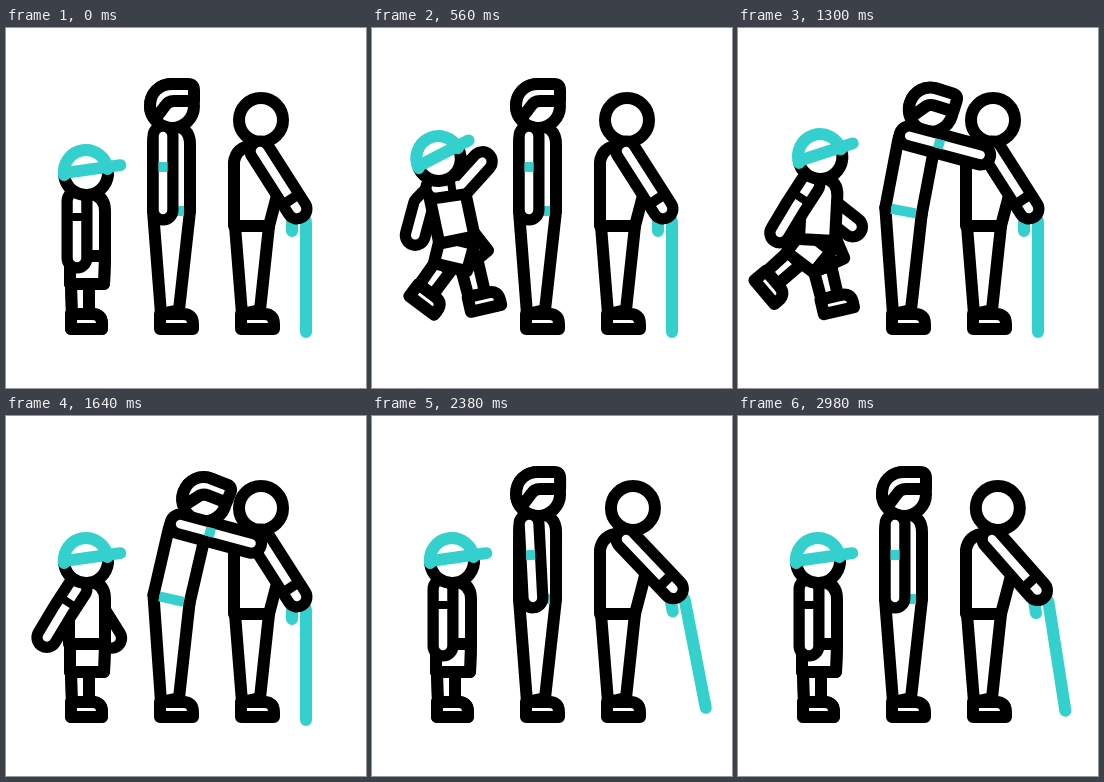
An HTML page with a canvas for the animation above (3 s loop, 360 by 360 pixels).

```html
<!DOCTYPE html>
<html lang="en">
<head>
<meta charset="utf-8">
<title>Three generations</title>
<style>
html, body { margin: 0; width: 100%; height: 100%; overflow: hidden; background: #fff }
canvas { display: block }
</style>
</head>
<body>
<canvas width="360" height="360"></canvas>
<script>
const ctx = document.querySelector('canvas').getContext('2d');
const BLACK = '#000', WHITE = '#fff', TEAL = '#33d0cd', LOOP = 3000, PEN = 12;

// Eased rise from 0 to 1 between two times
function rise(t, from, to) {
  const p = Math.min(1, Math.max(0, (t - from) / (to - from)));
  return p * p * (3 - 2 * p);
}

// Rises, holds, then falls back to 0
const hold = (t, a, b, c, d) => rise(t, a, b) - rise(t, c, d);

const rad = deg => deg * Math.PI / 180;

function turn(x, y, deg) {
  const c = Math.cos(rad(deg)), s = Math.sin(rad(deg));
  return [x * c - y * s, x * s + y * c];
}

function at(x, y, deg, draw) {
  ctx.save();
  ctx.translate(x, y);
  ctx.rotate(rad(deg));
  draw();
  ctx.restore();
}

function line(d, color = BLACK, width = PEN, cap = 'round') {
  ctx.strokeStyle = color;
  ctx.lineWidth = width;
  ctx.lineCap = cap;
  ctx.stroke(new Path2D(d));
}

function shape(d, color) {
  ctx.fillStyle = WHITE;
  ctx.fill(new Path2D(d));
  line(d, color);
}

function limb(d) {
  line(d, BLACK, 31);
  line(d, WHITE, 8.5);
}

function disc(x, y, r) {
  shape(`M${x - r} ${y}a${r} ${r} 0 1 1 ${2 * r} 0a${r} ${r} 0 1 1 ${-2 * r} 0Z`);
}

// Shoe with its heel at x, y
function shoe(x, y, w) {
  shape(`M${x} ${y}v-15h${w - 10}q10 0 10 10v5Z`);
}

function elder(t) {
  const wave = (from, length) => Math.cos(Math.PI * (t - from) / length);
  const swing = t < 1740 ? 0 : 7.25 * (t < 2690 ? 1 - wave(1740, 950) : 1 + wave(2690, 680));
  shape('M229 198L236 286L254 282L263 198Z');
  shoe(235, 301, 33);
  shape('M228 198V134Q230 119 248 117L275 152L263 198Z');
  disc(255 + swing * .54, 92, 22);
  at(254, 123, -swing, () => {
    line('M32 80V72a7 7 0 0 1 14 0V181', TEAL);
    limb('M0 0L37 58');
    line('M24 53L36 45', BLACK, 10);
  });
}

function adult(t) {
  const lean = hold(t, 800, 1480, 1800, 2400);
  const lift = 75 * hold(t, 680, 1280, 1800, 2460);
  const tilt = 13 * lean, px = 165, py = 183;
  const hip = x => {
    const [dx, dy] = turn(x, 0, tilt);
    return `${px + dx} ${py + dy}`;
  };
  shape(`M${hip(-18)}L155 286L173 282L${hip(19)}`);
  shoe(154, 301, 33);
  at(px, py, tilt, () => {
    shape('M-18 0V-68Q-18 -85 -1 -86Q19 -85 19 -67V0');
    line('M-12 0H13', TEAL, 10, 'butt');
    at(4.5 * lean, -73, 8 * lean, () => {
      disc(1, -32, 22);
      shape('M-17 -20Q-21 -26 -21 -32C-21 -45 -12 -54 1 -54H17Q23 -54 23 -48V-37H3Q-3 -37 -6 -32L-15 -20Z');
    });
  });
  const [sx, sy] = turn(-8, -75, tilt);
  at(px + sx, py + sy, -lift, () => {
    limb('M0 0V74');
    line('M-4.5 31H4.5', TEAL, 10, 'butt');
  });
}

function childArm(x, y, upper, lower) {
  const [ex, ey] = turn(0, 26, upper), [hx, hy] = turn(0, 31, lower);
  at(x, y, 0, () => limb(`M0 0l${ex} ${ey}l${hx} ${hy}`));
  at(x, y, upper, () => line('M-7 16H7', BLACK, 8));
}

function childLeg(x, y, thigh, shin) {
  const [kx, ky] = turn(-7, 28, thigh);
  at(x + kx, y + ky, shin, () => {
    shape('M-9 0L-8 30H9V0Z');
    shoe(-9, 45, 31);
  });
  at(x, y, thigh, () => shape('M-17 0V28H17L18 0Z'));
}

function child(t) {
  // Two hops with a dip between them: arm up on the first, arms back on the second
  const dip = hold(t, 720, 960, 960, 1200);
  const stride = hold(t, 160, 560, 1320, 1620);
  const kick = hold(t, 300, 740, 1200, 1620) - .7 * dip;
  const wave = hold(t, 160, 560, 560, 1160);
  const swing = hold(t, 960, 1280, 1740, 2100);
  const run = stride * swing;

  const x = 81 + 4 * wave - 2 * run;
  const y = 228 - 16 * stride + 13 * dip;
  const tilt = 3 * run - 12 * wave;
  const nod = 20 * dip - 10 * stride - 9 * wave - 8;
  const spread = stride - .4 * dip;
  const place = (dx, dy) => {
    const [a, b] = turn(dx, dy, tilt);
    return [x + a, y + b];
  };

  childArm(...place(-4, -55), 45 * wave - 28 * swing, 15 * wave - 32 * swing - 20 * run);
  childLeg(x, y, tilt - 28 * spread, -13 * spread);
  childLeg(x, y, tilt + 40 * kick, 58 * kick);
  at(x, y, tilt, () => shape('M-18 0V-45Q-18 -60 -4 -62H4Q18 -60 18 -45V0Z'));
  childArm(...place(-10, -55), 33 * swing - 98 * wave, 31 * swing - 138 * wave);
  at(...place(-1, -83), nod, () => {
    shape('M-22 0A22 22 0 0 0 22 0');
    shape('M-22 -1A22 22 0 0 1 22 -1', TEAL);
    line('M-22 -3H35', TEAL);
  });
}

function frame(now) {
  const t = now % LOOP;
  ctx.fillStyle = WHITE;
  ctx.fillRect(0, 0, 360, 360);
  ctx.lineJoin = 'round';
  elder(t);
  adult(t);
  child(t);
  requestAnimationFrame(frame);
}
frame(performance.now());
</script>
</body>
</html>
```
